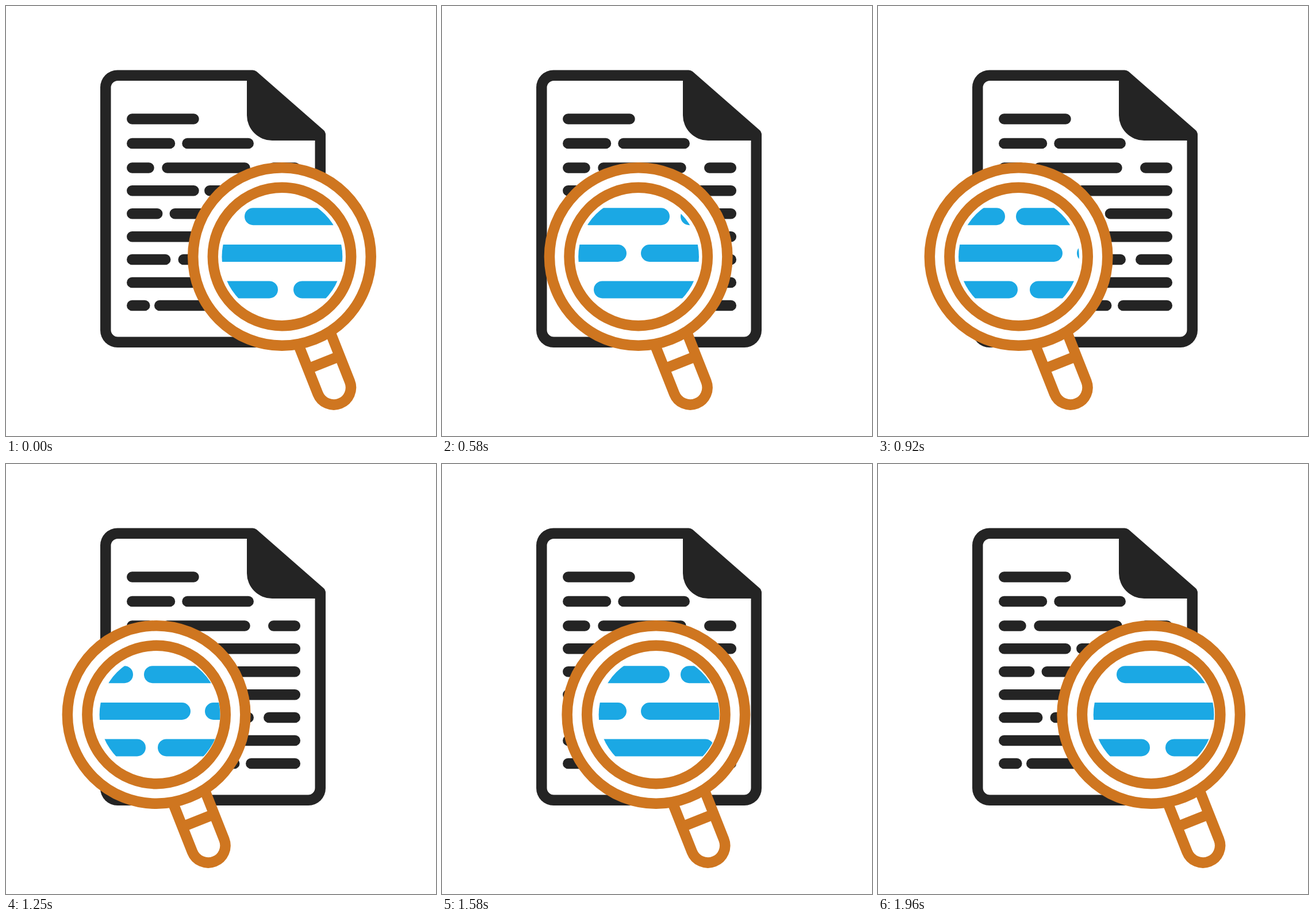
An HTML page without scripts for the animation above (2000 ms loop, 748 by 748 pixels).

```html
<!DOCTYPE html>
<html lang="en">
<head>
<meta charset="utf-8">
<title>Document search</title>
<style>
  @property --n { syntax: "<number>"; inherits: true; initial-value: 0; }

  html, body { margin: 0; width: 100%; height: 100%; overflow: hidden; background: #fff; }

  svg {
    display: block;
    width: 100%;
    height: 100%;
    animation: tick 2s steps(48) -4ms infinite;
    /* u: distance from the left turn, 0 to 1; p: the same, smoothed */
    --u: min(1, max(var(--n) - 25, 25 - var(--n)) / 24);
    --p: calc(var(--u) * var(--u) * (3 - 2 * var(--u)));
    --x: calc(234px + 246px * var(--p));
    /* the view runs slightly ahead of the lens on the way back */
    --lead: calc(clamp(0, var(--n) - 25, 1) * (5.7px - 1.7px * var(--p)));
  }
  @keyframes tick { from { --n: 0; } to { --n: 48; } }

  .lens { transform: translateX(var(--x)); }
  .view { transform: translateX(calc(var(--x) + .4px + var(--lead))); }

  .ink { fill: #242424; }
  .paper { fill: #fff; }
  .lines { fill: none; stroke: #242424; stroke-width: 18.5; stroke-linecap: round; }
  .zoom { fill: none; stroke: #1ba8e4; stroke-width: 30; stroke-linecap: round; }
  .lens { fill: #fff; stroke: #cf7620; stroke-width: 18.5; }
</style>
</head>
<body>
<svg viewBox="0 0 748 748">
  <defs>
    <clipPath id="view"><circle class="view" cy="436.3" r="104.9"/></clipPath>
  </defs>

  <path class="ink" d="M194 111.5H429Q433 111.5 436 114L552 215.5Q556 219 556 224V564a30 30 0 0 1-30 30H194a30 30 0 0 1-30-30V141.5a30 30 0 0 1 30-30z"/>
  <path class="paper" d="M194.5 130H419V190a44 44 0 0 0 44 44H537.5V563.5a12 12 0 0 1-12 12H194.5a12 12 0 0 1-12-12V142a12 12 0 0 1 12-12z"/>

  <path class="lines" d="
    M219.3 196.5H326.5
    M219.3 239H285M315.5 239H421.7
    M219.3 281.5H248.5M280.5 281.5H415.5M465.3 281.5H502.8
    M219.3 321.3H326.5M354.3 321.3H502.8
    M219.3 361.2H263.2M293.8 361.2H374M404 361.2H502.8
    M219.3 401.2H502.8
    M219.3 441H277.2M308.7 441H421.7M457.3 441H502.8
    M219.3 481H502.8
    M219.3 521H241.3M267.2 521H397.2M426.3 521H502.8"/>

  <g class="lens">
    <g transform="translate(0 436) rotate(-21.6)">
      <path d="M-29.75 140V245a29.75 29.75 0 0 0 59.5 0V140z"/>
      <path d="M-29.75 198H29.75"/>
    </g>
    <circle cy="436" r="154.75"/>
    <circle cy="436" r="120.2"/>
  </g>

  <g clip-path="url(#view)">
    <path class="zoom" d="
      M100 366.2H206M255 366.2H381M430 366.2H660
      M100 430H306M361 430H660
      M100 493.4H228M279 493.4H458M515 493.4H660"/>
  </g>
</svg>
</body>
</html>
```
